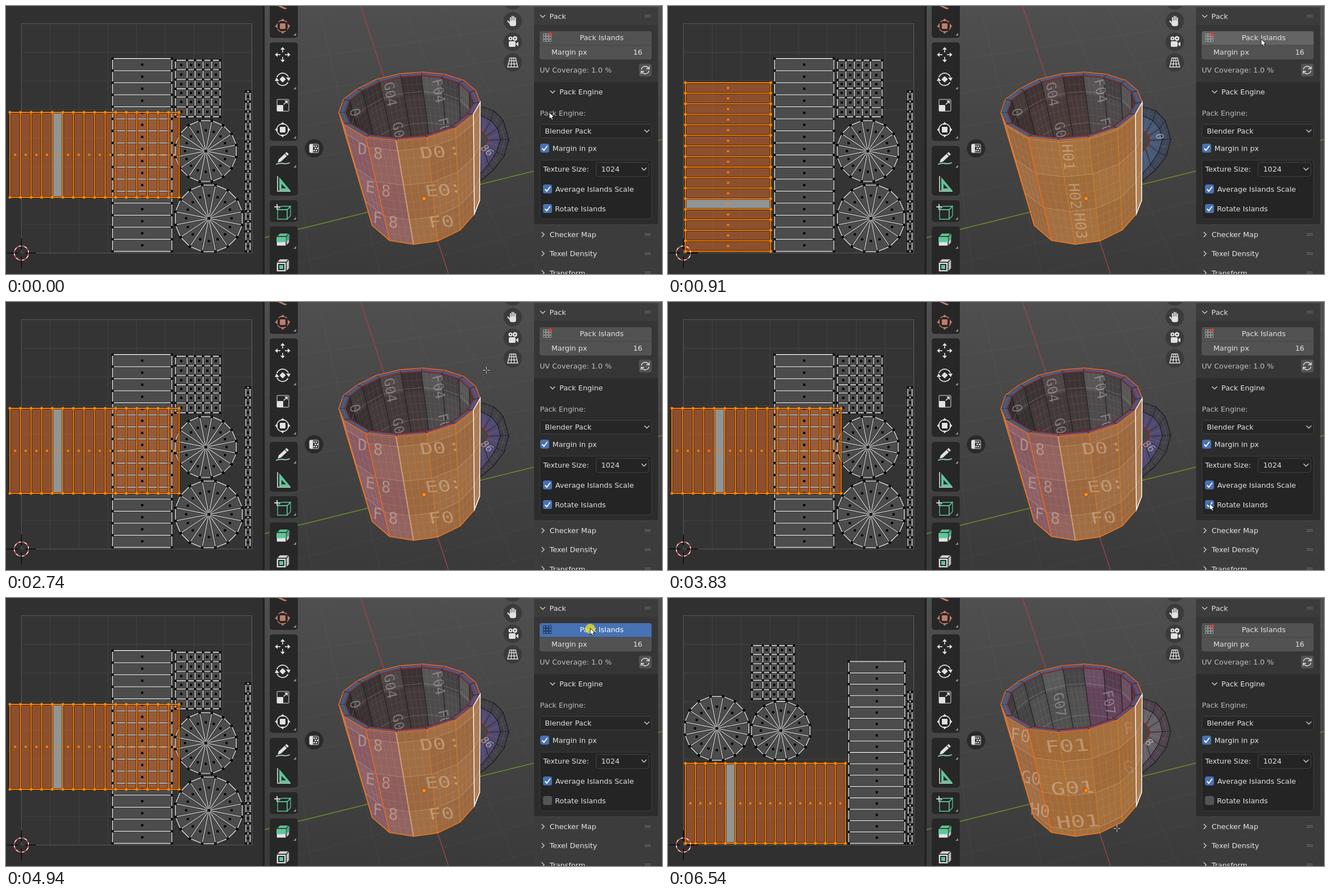
Animation, 1169 px wide and 479 px high, one loop 6.61 s. Source, as an HTML page with a canvas:

```html
<!DOCTYPE html>
<html lang="en">
<head>
<meta charset="utf-8">
<title>UV packing</title>
<style>
html,body{margin:0;width:100%;height:100%;overflow:hidden;background:#303030}
canvas{display:block;width:1169px;height:479px}
</style>
</head>
<body>
<canvas id="stage" width="1169" height="479"></canvas>
<script>
const W = 1169, H = 479, LOOP = 6610, TAU = Math.PI * 2;
const screen2d = document.getElementById('stage').getContext('2d');
let c = screen2d;

// ---------- helpers ----------
const seq = (a, b, n) => Array.from({length: n + 1}, (_, i) => a + (b - a) * i / n);
const mix = (p, q, u) => [p[0] + (q[0] - p[0]) * u, p[1] + (q[1] - p[1]) * u];

function trace(pts, closed) {
  c.beginPath();
  pts.forEach((p, i) => i ? c.lineTo(p[0], p[1]) : c.moveTo(p[0], p[1]));
  if (closed) c.closePath();
}
function line(pts, color, w = 1) {
  trace(pts);
  c.strokeStyle = color; c.lineWidth = w; c.stroke();
}
function poly(pts, fill, stroke, w = 1) {
  trace(pts, true);
  if (fill) { c.fillStyle = fill; c.fill(); }
  if (stroke) { c.strokeStyle = stroke; c.lineWidth = w; c.stroke(); }
}
function box(x, y, x2, y2, r, fill, stroke) {
  c.beginPath();
  c.roundRect(x, y, x2 - x, y2 - y, r);
  if (fill) { c.fillStyle = fill; c.fill(); }
  if (stroke) { c.strokeStyle = stroke; c.lineWidth = 1; c.stroke(); }
}
function disc(x, y, r, fill, stroke, w = 1) {
  c.beginPath(); c.arc(x, y, r, 0, TAU);
  if (fill) { c.fillStyle = fill; c.fill(); }
  if (stroke) { c.strokeStyle = stroke; c.lineWidth = w; c.stroke(); }
}
function dot(x, y, s, color) {
  c.fillStyle = color; c.fillRect(x - s / 2, y - s / 2, s, s);
}
function at(x, y, draw) {
  c.save(); c.translate(x, y); draw(); c.restore();
}
function fourWays(draw) {
  for (let i = 0; i < 4; i++) { c.save(); c.rotate(i * TAU / 4); draw(); c.restore(); }
}
function label(s, x, y, color = '#e4e4e4', align = 'left') {
  c.font = '12.8px "DejaVu Sans", sans-serif';
  c.textAlign = align; c.textBaseline = 'alphabetic';
  c.fillStyle = color; c.fillText(s, x, y + 4.7);
}

// ---------- UV editor ----------
const ORANGE = '#ff8500', WIRE = '#c6c6c6', FACE = '#4c4c4c';

function wire(pts, w = 1.8) {
  line(pts, 'rgba(20,20,20,.6)', w + 1.5);
  line(pts, WIRE, w);
}
// Islands come as a fill and a net, so every net lies above every fill.
function island(xs, ys, size = 4) {
  const l = xs[0], r = xs.at(-1), t = ys[0], b = ys.at(-1);
  return {
    fill() { c.fillStyle = FACE; c.fillRect(l, t, r - l, b - t); },
    net() {
      xs.forEach(x => wire([[x, t], [x, b]]));
      ys.forEach(y => wire([[l, y], [r, y]]));
      xs.forEach((x, i) => ys.forEach((y, j) => {
        dot(x, y, size, '#000');
        if (i && j) dot((x + xs[i - 1]) / 2, (y + ys[j - 1]) / 2, 4, '#000');
      }));
    }
  };
}
function selected(xs, ys, active) {
  const l = xs[0], r = xs.at(-1), t = ys[0], b = ys.at(-1), tall = xs.length > 2;
  return {
    fill() {
      for (let i = 0; i < 16; i++) {
        c.fillStyle = i === active ? 'rgba(160,162,162,.88)' : 'rgba(215,105,45,.55)';
        if (tall) c.fillRect(xs[i], t, xs[i + 1] - xs[i], b - t);
        else c.fillRect(l, ys[i], r - l, ys[i + 1] - ys[i]);
      }
    },
    net() {
      for (const [col, w] of [['rgba(25,15,5,.65)', 3.8], [ORANGE, 1.8]]) {
        xs.forEach(x => line([[x, t], [x, b]], col, w));
        ys.forEach(y => line([[l, y], [r, y]], col, w));
      }
      xs.forEach((x, i) => ys.forEach((y, j) => {
        disc(x, y, 2.5, ORANGE);
        if (i && j) dot((x + xs[i - 1]) / 2, (y + ys[j - 1]) / 2, 3.6, ORANGE);
      }));
    }
  };
}
function wheel(x, y, r) {
  const spot = (k, f) => [x + r * f * Math.sin(k * TAU / 16), y - r * f * Math.cos(k * TAU / 16)];
  const rim = seq(0, 15, 15).map(i => spot(i + .5, 1));
  return {
    fill() { poly(rim, FACE); },
    net() {
      rim.forEach(p => wire([[x, y], p], 1.5));
      wire([...rim, rim[0]]);
      rim.forEach((p, i) => {
        dot(...p, 4.4, '#000');
        dot(...spot(i, .67), 4, '#000');
      });
      dot(x, y, 4.4, '#000');
    }
  };
}
const COLS = [0, .26, .44, .62, .81, 1], ROWS = [0, .165, .34, .505, .65, .825, 1];
const flip = list => list.map(u => 1 - u).reverse();
function patch(x, y, w, h, turned) {
  const [us, vs] = turned ? [flip(COLS), flip(ROWS)] : [COLS, ROWS];
  return island(us.map(u => x + u * w), vs.map(v => y + v * h));
}

function islands(state) {
  if (state === 'C') return [
    island([322, 422], seq(113.5, 438.5, 16)),
    patch(149.5, 85, 75, 95.5),
    wheel(87, 233, 58),
    wheel(201, 237, 53),
    island([428, 435], seq(168, 438.5, 16)),
    selected(seq(31, 316, 16), [295.5, 438.5], 4)
  ];
  return [
    island([190, 295.5], seq(94, 438.5, 16)),
    patch(302, 97, 79.5, 101, state === 'B'),
    wheel(356, 259.3, 55.3),
    wheel(361.5, 379.5, 60.6),
    island([427.5, 435], seq(153, 438.5, 16)),
    state === 'A' ? selected(seq(7, 308.5, 16), [190, 342], 4)
      : selected([31, 183], seq(137, 438.5, 16), 11)
  ];
}
function uvEditor(state) {
  c.fillStyle = '#303030'; c.fillRect(0, 0, 458, H);
  c.fillStyle = '#343434'; c.fillRect(27.5, 31, 410.5, 410);
  seq(27.5, 438, 8).forEach(x => line([[x, 31], [x, 441.5]], '#434343'));
  seq(31.5, 441.5, 8).forEach(y => line([[27.5, y], [438, y]], '#434343'));
  c.lineWidth = 1; c.strokeStyle = '#5a5a5a'; c.strokeRect(27.5, 31.5, 410.5, 410);
  const list = islands(state);
  list.forEach(i => i.fill());
  list.forEach(i => i.net());
  at(27.5, 441.5, () => {
    disc(0, 0, 12.8, null, '#fff', 1.6);
    c.setLineDash([5.03, 5.03]);
    disc(0, 0, 12.8, null, '#e02a2a', 1.6);
    c.setLineDash([]);
    fourWays(() => line([[6, 0], [26, 0]], '#000', 1.2));
  });
  c.fillStyle = '#222'; c.fillRect(457, 0, 4, H);
}

// ---------- mug ----------
const RIM = [[593, 190], [602, 211], [641, 234], [695, 240], [750, 235], [801, 218], [833, 193], [845, 172],
  [837, 151], [816, 133], [782, 122], [742, 118], [702, 121], [660, 131], [626, 148], [601, 167]];
const INNER = RIM.map(([x, y]) => [720 + (x - 720) * .905, 179 + (y - 178) * .91]);
const foot = ([x, y]) => [x + 50 - .212 * (x - 605), y + 175 + .16 * (y - 172)];
const LOOKS = {
  A: {
    face: ['#845b62', '#875a63', '#8d5d5c', '#9c683f'], rim: ['#4a546f', '#584c6c'],
    wall: ['#43393a', '#4d4a4b'], handle: ['#414047', '#514a70'], start: .1, size: 28, wide: 1.35,
    out: [['D', 635, 257], ['8', 663, 265], ['E', 649, 325], ['8', 677, 332], ['F', 662, 380], ['8', 690, 388],
      ['D0', 761, 263], ['E0', 770, 331], ['F0', 776, 387], [':', 799, 258], [':', 801, 325]], turn: -.06,
    inn: [['G04', 684, 158], ['F04', 770, 152], ['G0', 698, 222], ['F0', 779, 214], ['0', 621, 190]], grip: '86'
  },
  B: {
    face: ['#996740', '#9b683f', '#9f6a3c', '#a06b3a'], rim: ['#4a5672', '#4d5470'],
    wall: ['#493a3a', '#4d4849'], handle: ['#3d465a', '#485a76'], start: .02, size: 26, wide: 1,
    out: [['H01', 712, 270], ['H02', 724, 340], ['H03', 734, 393]], turn: 1.46,
    inn: [['G04', 684, 158], ['F04', 770, 152], ['G0', 698, 222], ['F0', 779, 214], ['0', 621, 190]], grip: '0'
  },
  C: {
    face: ['#9c6743', '#9d6840', '#a16a38', '#a06a39'], rim: ['#4f5674', '#584c6c'],
    wall: ['#505050', '#61435a'], handle: ['#4e424d', '#666167'], start: .28, size: 30, wide: 1.42,
    out: [['F0', 628, 247], ['G0', 647, 323], ['H0', 663, 381], ['F01', 711, 266], ['G01', 721, 341],
      ['H01', 731, 401], ['F', 821, 235], ['G', 821, 304]], turn: -.05,
    inn: [['G07', 697, 191], ['F07', 785, 187]], grip: '8'
  }
};

function stamp(s, x, y, size, turn, color, lean = 0, wide = 1) {
  at(x, y, () => {
    c.rotate(turn); c.transform(wide, 0, lean, 1, 0, 0);
    c.font = `${size}px "DejaVu Sans Mono", monospace`;
    c.textAlign = 'center'; c.textBaseline = 'middle';
    c.fillStyle = color; c.fillText(s, 0, 1);
  });
}
// Texture lines across one side of the mug.
function weave(a, b, start, alpha, strong) {
  const a2 = foot(a), b2 = foot(b);
  for (let k = 0; k <= 12; k++) {
    const v = start + (k - 1) * .083;
    if (v < 0 || v > 1) continue;
    const big = k % 4 === 1;
    line([mix(a, a2, v), mix(b, b2, v)], `rgba(255,235,215,${alpha * (big ? 1.9 : 1)})`, big ? 1.2 : .8);
  }
  for (let k = 0; k < 4; k++) {
    line([mix(a, b, k / 4), mix(a2, b2, k / 4)], `rgba(255,235,215,${strong && !k ? alpha * 1.9 : alpha})`, .8);
  }
}
function mugHandle(look) {
  const out = [[838, 178], [846, 180], [869, 187], [886, 204], [896, 238], [888, 268], [869, 293], [845, 313]];
  const mid = [[838, 194], [846, 196], [864, 205], [876, 219], [881, 239], [874, 261], [860, 283], [845, 300]];
  const hole = [[838, 219], [846, 221], [852, 226], [857, 232], [860, 240], [856, 248], [851, 256], [845, 263]];
  poly([...out, ...hole.slice().reverse()], look.handle[0], '#18181c', 1.2);
  poly([...mid, ...hole.slice().reverse()], look.handle[1]);
  for (let i = 1; i < out.length; i++) {
    line([out[i], mid[i], hole[i]], '#202025', 1);
    line([mix(out[i - 1], out[i], .5), mix(mid[i - 1], mid[i], .5), mix(hole[i - 1], hole[i], .5)], 'rgba(255,255,255,.14)', .8);
  }
  line(mid, '#1b1b20', 1.1);
  line(mid.map((p, i) => mix(p, out[i], .5)), 'rgba(255,255,255,.12)', .8);
  line(hole, '#b52a2a', 1.2);
  const left = look.grip === '0';
  stamp(look.grip, left ? 876 : 857, left ? 233 : 258, 18, left ? 1.2 : .75, 'rgba(230,230,235,.55)', -.2);
}
function mug(look) {
  mugHandle(look);
  poly([...RIM.slice(0, 8).map(foot).reverse(), ...RIM.slice(0, 8)], look.face[3]);

  // rim ring
  for (let i = 0; i < 16; i++) {
    const j = (i + 1) % 16;
    poly([RIM[i], RIM[j], INNER[j], INNER[i]], look.rim[i > 2 && i < 12 ? 1 : 0]);
    line([RIM[i], INNER[i]], '#1d1d28', 1);
    line([mix(RIM[i], INNER[i], .5), mix(RIM[j], INNER[j], .5)], 'rgba(255,255,255,.16)', .7);
  }

  // inside
  c.save();
  trace(INNER, true); c.clip();
  c.fillStyle = look.wall[0]; c.fillRect(590, 110, 260, 140);
  for (let i = 7; i < 16; i++) {
    const a = INNER[i], b = INNER[(i + 1) % 16], quad = [a, b, foot(b), foot(a)];
    poly(quad, look.wall[i < 11 ? 1 : 0]);
    poly([a, b, mix(b, foot(b), .2), mix(a, foot(a), .2)], i % 2 ? 'rgba(0,0,0,.12)' : 'rgba(255,255,255,.06)');
    if (i > 13 || i === 7) poly(quad, 'rgba(0,0,0,.18)');
    weave(a, b, .17, .1, i % 2);
    line([a, foot(a)], '#1b1b1b', 1.1);
  }
  look.inn.forEach(([s, x, y]) => stamp(s, x, y, 24, 1.42, 'rgba(205,200,200,.42)', .1));
  c.restore();
  poly(INNER, null, 'rgba(28,28,34,.7)', 1.8);
  poly(INNER, null, '#b92828', 1);

  // outside
  for (let i = 0; i < 7; i++) {
    const a = RIM[i], b = RIM[i + 1], a2 = foot(a), b2 = foot(b);
    poly([a, b, b2, a2], look.face[Math.min(i, 3)]);
    for (let k = 0; k < 4; k++) {
      const v = Math.max(0, look.start + (k - 1) * .332), w = Math.min(1, look.start + k * .332);
      if (w <= v || (k + (i >> 1)) % 2) continue;
      poly([mix(a, a2, v), mix(b, b2, v), mix(b, b2, w), mix(a, a2, w)], 'rgba(255,215,160,.05)');
    }
    weave(a, b, look.start, .11, i % 2);
  }
  const upright = look.turn < 0;
  look.out.forEach(([s, x, y]) => {
    const side = upright && x < 700, far = x > 815;
    stamp(s, x, y, look.size, side ? .16 : look.turn, `rgba(232,208,185,${far ? .18 : .42})`,
      upright ? .14 : -.1, side || far ? 1 : look.wide);
  });
  RIM.slice(0, 8).forEach((p, i) => {
    const seam = i === 2;
    line([p, foot(p)], seam ? '#f0691c' : i < 2 ? '#d86f26' : '#cc7f22', seam ? 1.6 : 1);
  });
  if (look === LOOKS.A) line([RIM[3], foot(RIM[3])], 'rgba(225,200,185,.5)', 2);
  line(RIM.slice(0, 8).map(foot), '#f07a1e', 1.5);
  line([RIM[0], foot(RIM[1])], '#f2761e', 1.4);
  poly(RIM, null, '#f0641c', 1.4);
  poly([RIM[6], RIM[7], foot(RIM[7]), foot(RIM[6])], 'rgba(210,200,190,.12)', '#fff', 1.4);
  disc(745, 344, 3.8, '#ff8a1c', '#7a4010', .8);
}

// ---------- 3D viewport ----------
const LIGHT = '#e2e2e2', GREEN = '#5cc79a', DARK = '#272727';

function head(d, size, color) {
  poly([[d, -size], [d + size * 1.2, 0], [d, size]], color);
}
function gizmo(color, dashed) {
  c.setLineDash(dashed ? [7, 3.2] : []);
  disc(0, 0, 10.5, null, color, 1.5);
  c.setLineDash([]);
  box(-5, -5, 5, 5, 1, color);
  fourWays(() => head(9, 4, color));
}
function cube(top, front, stroke) {
  poly([[-11, -6], [-5, -12], [12, -12], [6, -6]], top, stroke, 1.3);
  poly([[6, -6], [12, -12], [12, 5], [6, 11]], front && '#bdbdbd', stroke, 1.3);
  poly([[-11, -6], [6, -6], [6, 11], [-11, 11]], front, stroke, 1.3);
}
function tools() {
  for (const [y, y2] of [[-10, 57], [65, 241], [250, 339], [347, 386], [394, 490]]) box(470, y, 520, y2, 5, DARK);
  for (const y of [53, 149, 237, 289, 382, 434]) poly([[517, y - 5], [517, y], [512, y]], '#8a8a8a');
  poly([[484, 0], [490, 0], [501, 4], [497, 6]], '#b9806f');
  at(493, 36, () => gizmo('#bf7d69', true));
  at(493, 87, () => fourWays(() => { line([[4, 0], [10, 0]], LIGHT, 1.6); head(9, 4, LIGHT); }));
  at(493, 131, () => {
    c.beginPath(); c.arc(0, 0, 11, .5, 2.8); c.moveTo(-10.3, -3.8); c.arc(0, 0, 11, 3.5, 5.9);
    c.strokeStyle = LIGHT; c.lineWidth = 1.7; c.stroke();
    poly([[-14, 3], [-6, 3], [-11, -3]], LIGHT);
    poly([[14, -3], [6, -3], [11, 3]], LIGHT);
    c.rotate(TAU / 8); box(-4, -4, 4, 4, 1, LIGHT);
  });
  at(493, 177, () => {
    box(-10, -10, 11, 11, 1, null, LIGHT);
    box(-10, 0, 1, 11, 1, LIGHT);
    line([[2, -1], [7, -6]], LIGHT, 1.7);
    poly([[3, -8], [9, -8], [9, -2]], LIGHT);
  });
  at(493, 221, () => gizmo(LIGHT));
  at(493, 272, () => {
    c.beginPath(); c.moveTo(-12, 11); c.bezierCurveTo(0, 6, 2, 13, 13, 8);
    c.strokeStyle = '#9fd8c4'; c.lineWidth = 1.8; c.stroke();
    poly([[-9, 8], [-7, 2], [7, -11], [11, -7], [-3, 6]], LIGHT);
    line([[4, -8], [8, -4]], DARK, 1.2);
  });
  at(493, 318, () => {
    poly([[-6, -12], [-6, 12], [14, 12]], GREEN);
    poly([[-2, 0], [-2, 8], [6, 8]], DARK);
    line([[-9, -14], [-9, 13], [14, 13]], LIGHT, 1.6);
  });
  at(495, 370, () => {
    cube(null, null, GREEN);
    line([[-12, -16], [-12, -6]], LIGHT, 1.8); line([[-17, -11], [-7, -11]], LIGHT, 1.8);
  });
  at(493, 418, () => {
    cube(GREEN, LIGHT, DARK);
    poly([[-11, -5], [6, -5], [6, 4], [-11, 4]], GREEN);
    poly([[7, -6], [12, -11], [12, -2], [7, 3]], '#46a57d');
  });
  at(493, 464, () => {
    cube('#d5d5d5', LIGHT, DARK);
    box(-8, -3, 3, 8, 0, DARK);
    box(-6, -1, 1, 6, 0, GREEN);
  });
}
function navButtons() {
  const back = '#3b3b3b';
  for (const y of [-10, 27, 64, 101]) disc(903, y, 16.5, back);
  at(903, 27, () => {
    box(-5.5, -1, 6, 9, 4, LIGHT);
    c.lineCap = 'round';
    [[-4, -6], [-1, -8.5], [2, -8], [4.8, -5.5]].forEach(([x, y]) => line([[x, 2], [x, y]], LIGHT, 2.1));
    line([[-4, 5], [-8.5, 0]], LIGHT, 2.3);
    c.lineCap = 'butt';
  });
  at(903, 64, () => {
    disc(-4, -6, 3.6, LIGHT); disc(4, -6, 4.2, LIGHT);
    box(-7, -1, 5, 9, 2, LIGHT);
    poly([[6, 3], [10, 0], [10, 8], [6, 5]], LIGHT);
    disc(-4, -6, 1.2, back); disc(4, -6, 1.4, back);
  });
  at(903, 101, () => {
    poly([[-5, -8], [5, -8], [9, 8], [-9, 8]], null, LIGHT, 1.4);
    line([[-1.6, -8], [-3, 8]], LIGHT, 1.3); line([[1.6, -8], [3, 8]], LIGHT, 1.3);
    line([[-6.3, -3], [6.3, -3]], LIGHT, 1.3); line([[-7.6, 2.5], [7.6, 2.5]], LIGHT, 1.3);
  });
  disc(549, 254.5, 16.5, '#2a2a2a');
  at(549, 254.5, () => {
    box(-8, -7.5, 8, 7.5, 2, null, LIGHT);
    box(-8, -7.5, -2, 7.5, 1, LIGHT);
    for (let i = 0; i < 6; i++) dot(i % 2 * 4 + (i >> 1) % 2 * 2, -4 + (i >> 1) * 4, 2.6, LIGHT);
  });
}
function viewport(state) {
  const g = c.createLinearGradient(0, 0, 0, H);
  g.addColorStop(0, '#4f4f4f'); g.addColorStop(1, '#3a3a3a');
  c.fillStyle = g; c.fillRect(461, 0, W - 461, H);
  for (let i = -5; i < 7; i++) {
    if (!i) continue;
    line([[632 + i * 75, 0], [788 + i * 122, H]], 'rgba(255,255,255,.045)');
    line([[461, 414 + i * 62], [W, 238.5 + i * 48]], 'rgba(255,255,255,.045)');
  }
  line([[632, 0], [788.5, H]], '#a2434c', 1.4);
  line([[461, 414], [W, 238.5]], '#6b8f25', 1.5);
  mug(LOOKS[state]);
  tools();
  navButtons();
}

// ---------- side panel ----------
function chevron(x, y, right) {
  line(right ? [[x - 2, y - 4.5], [x + 2.5, y], [x - 2, y + 4.5]] : [[x - 4.5, y - 2], [x, y + 2.5], [x + 4.5, y - 2]], '#d0d0d0', 1.4);
}
function grip(y) {
  for (let i = 0; i < 8; i++) dot(1139.5 + i % 4 * 2.7, y - 1.5 + (i >> 2) * 3, 1.4, '#8c8c8c');
}
function check(x, y, on) {
  box(x, y, x + 16, y + 16, 3.5, on ? '#4772b3' : '#545454');
  if (on) line([[x + 3.5, y + 8.5], [x + 6.7, y + 12], [x + 12.7, y + 4]], '#fff', 1.9);
}
function packIcon(pressed) {
  for (let i = 0; i < 9; i++) {
    const x = 957.5 + i % 3 * 5, y = 49.5 + (i / 3 | 0) * 5;
    box(x, y, x + 4, y + 4, 0, null, pressed ? '#1f3557' : '#979797');
  }
  box(967, 47.5, 973, 53.5, 1, pressed ? '#35609e' : '#c4473c');
}
function panel(press, hover, rotate) {
  const header = '#3c3c3c';
  box(941, 2, 1162, 390, 4, '#363636');
  box(941, 2, 1162, 34, [4, 4, 0, 0], header);
  box(941, 136, 1162, 390, [0, 0, 4, 4], '#2c2c2c');
  for (const y of [393, 427.5, 462]) box(941, y, 1162, y + 31, 4, header);
  chevron(956.5, 18); label('Pack', 968.5, 18); grip(18);

  box(951, 45, 1150.5, 70, [4, 4, 0, 0], press ? '#4772b3' : hover ? '#646464' : '#525252');
  box(951, 70, 1150.5, 95.5, [0, 0, 4, 4], '#525252');
  line([[951, 70.2], [1150.5, 70.2]], '#404040', .8);
  packIcon(press);
  label('Pack Islands', 1061.5, 56.5, press ? '#fff' : undefined, 'center');
  label('Margin px', 972, 82); label('16', 1134, 82, undefined, 'right');
  label('UV Coverage: 1.0 %', 951, 114, '#bebebe');
  box(1128, 103, 1150.5, 126, 4, '#525252');
  at(1139, 114.5, () => {
    for (let i = 0; i < 2; i++) {
      c.beginPath(); c.arc(0, 0, 6.8, 3.3, 5.9);
      c.strokeStyle = LIGHT; c.lineWidth = 1.4; c.stroke();
      line([[7.5, -7], [7, -2], [2, -2.5]], LIGHT, 1.4);
      c.rotate(Math.PI);
    }
  });
  chevron(974, 153); label('Pack Engine', 986.3, 153);
  label('Pack Engine:', 951.5, 191, '#bdbdbd');
  box(951.5, 211.5, 1150.5, 235.5, 4, '#262626', '#424242');
  label('Blender Pack', 960.3, 223); chevron(1142, 223);
  check(952, 246, true); label('Margin in px', 973.7, 254);

  box(951.5, 275.5, 1150.5, 380.5, 4, '#242424', '#3e3e3e');
  label('Texture Size:', 957.2, 291);
  box(1051.5, 279.5, 1145.5, 304.5, 4, '#242424', '#444');
  label('1024', 1060.7, 291); chevron(1137, 291);
  check(957, 319, true); label('Average Islands Scale', 979, 327);
  check(957, 354, rotate); label('Rotate Islands', 978.3, 362);

  [['Checker Map', 408.5], ['Texel Density', 442.5], ['Transform', 477]].forEach(([s, y]) => {
    chevron(956.5, y, true); label(s, 968.7, y); grip(y);
  });
}

// ---------- pointer ----------
const HOME = [968, 190];
const MOVES = [ // first step, last step, step count, goal
  [70, 710, 10, [1057, 59]],
  [1630, 1910, 5, [670, 149]],
  [1980, 2190, 4, [856, 122]],
  [3260, 3900, 10, [968, 367]],
  [4100, 4600, 8, [1042, 55]],
  [4670, 4670, 1, [1041, 54]],
  [6260, 6540, 5, [800, 412]]
];
function pointerAt(t) {
  let p = HOME;
  for (const [from, to, n, goal] of MOVES) {
    if (t < from) break;
    const step = n > 1 ? (to - from) / (n - 1) : 1;
    const u = Math.min(1, (Math.floor((t - from) / step + .01) + 1) / n);
    p = mix(p, goal, u * u * (3 - 2 * u));
  }
  return p.map(Math.round);
}
function pointer([x, y], click) {
  if (click) disc(x, y + 1, 9, 'rgba(226,220,50,.8)');
  at(x, y, () => {
    if (x < 941) {
      for (const [col, w] of [['rgba(0,0,0,.7)', 3], ['#fff', 1.2]]) {
        fourWays(() => line([[1.5, 0], [6, 0]], col, w));
      }
    } else {
      poly([[0, 0], [0, 12], [2.7, 9.5], [4.7, 13.5], [6.8, 12.5], [5, 8.7], [8.7, 8.4]], '#fff', '#111', 1);
    }
  });
}

// ---------- playback ----------
const scenes = {};
for (const state of ['A', 'B', 'C']) {
  const sheet = document.createElement('canvas');
  sheet.width = W; sheet.height = H;
  c = sheet.getContext('2d');
  viewport(state);
  uvEditor(state);
  scenes[state] = sheet;
}
c = screen2d;

const within = (t, a, b) => t >= a && t < b;
function render(t) {
  const state = within(t, 910, 2670) ? 'B' : t >= 5070 ? 'C' : 'A';
  const press = within(t, 780, 910) || within(t, 4940, 5070);
  const p = pointerAt(t);
  const hover = p[0] > 950 && p[0] < 1151 && p[1] > 44 && p[1] < 70;
  c.drawImage(scenes[state], 0, 0);
  panel(press, hover, t < 3970);
  pointer(p, press || within(t, 3970, 4100));
}
const begin = performance.now();
function tick() {
  render((performance.now() - begin) % LOOP);
  requestAnimationFrame(tick);
}
tick();
</script>
</body>
</html>
```
